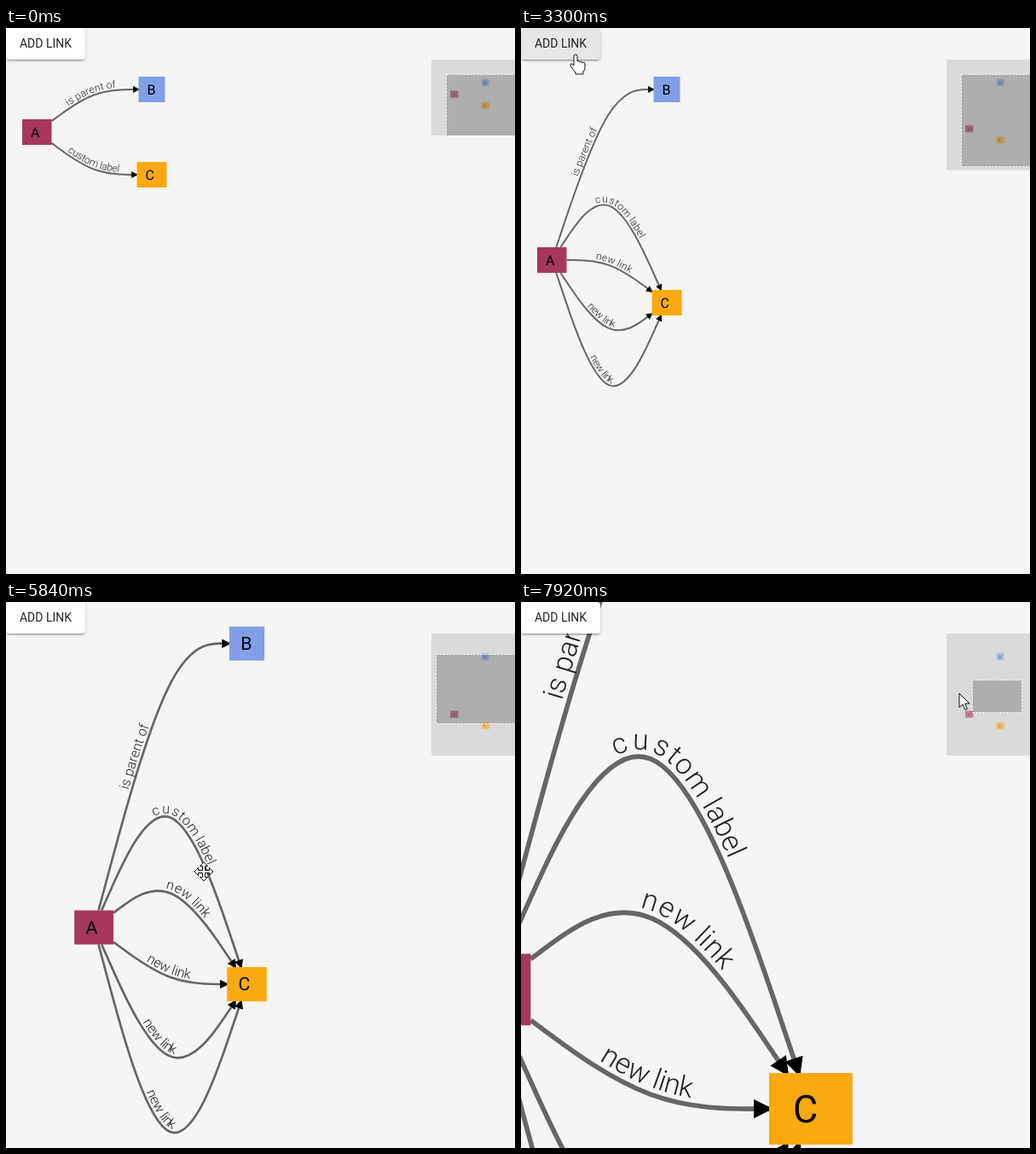
An HTML page for the animation above (8000 ms loop, 597 by 640 pixels).

```html
<!DOCTYPE html>
<html lang="en">
<head>
<meta charset="utf-8">
<title>Graph links</title>
<style>
  html, body { margin: 0; width: 100%; height: 100%; overflow: hidden; background: #f5f5f5; }
  body { position: relative; font-family: Roboto, sans-serif; }
  svg { display: block; position: absolute; left: 0; top: 0; }
  .link { fill: none; stroke: #666; stroke-width: 2; }
  .label { font-size: 12px; font-weight: 300; fill: #251e1e; text-anchor: middle; }
  .node { font-size: 16px; fill: #000; }
  text { text-rendering: geometricPrecision; }
  #button {
    position: absolute; left: 0; top: 0; width: 93px; height: 37px; border-radius: 4px;
    overflow: hidden; background: #fff; color: rgba(0, 0, 0, .87);
    font: 400 14px/37px Roboto, sans-serif; text-align: center;
    box-shadow: 0 3px 1px -2px rgba(0,0,0,.2), 0 2px 2px rgba(0,0,0,.14), 0 1px 5px rgba(0,0,0,.12);
  }
  #button.down {
    box-shadow: 0 5px 5px -3px rgba(0,0,0,.2), 0 8px 10px 1px rgba(0,0,0,.14), 0 3px 14px 2px rgba(0,0,0,.12);
  }
  #ripple {
    position: absolute; left: -11px; top: -43px; width: 150px; height: 150px;
    border-radius: 50%; background: rgba(0, 0, 0, .1);
  }
  #cursors path { fill: #fff; stroke: #111; stroke-linejoin: round; }
  #spot { fill: #fbf45c; mix-blend-mode: multiply; }
</style>
</head>
<body>
<svg width="597" height="640" viewBox="0 0 597 640">
  <defs>
    <marker id="arrow" viewBox="0 -5 10 10" refX="8" refY="0" markerWidth="4" markerHeight="4" orient="auto">
      <path d="M0-5L10 0L0 5"/>
    </marker>
  </defs>
  <g id="graph"></g>
  <svg id="map" x="499" y="37" width="98" height="89">
    <rect width="98" height="200" fill="#dadada"/>
    <g id="mini" opacity=".55" transform="translate(17 7.6) scale(.27)"></g>
    <rect id="view" fill="rgba(0,0,0,.2)" stroke="#fff" stroke-dasharray="2 2"/>
  </svg>
</svg>
<div id="button"><div id="ripple"></div>ADD LINK</div>
<svg id="cursors" width="597" height="640" viewBox="0 0 597 640">
  <path id="move" d="M0-11l4.5 4.5h-3v5h5v-3L11 0 6.500 4.500v-3h-5v5h3L0 11l-4.500-4.500h3v-5h-5v3L-11 0l4.500-4.500v3h5v-5h-3z"/>
  <path id="hand" d="M-2 12V1Q-2-1 0-1T2 1V7Q4 5 5 8 7 6 8 9 11 7 11 11V15Q11 18 9 19V22H0V20Q-3 17-6 12-6 9-4 10Z"/>
  <path id="pointer" d="M0 0V16.500L4 13 7 19.500 9.500 18.300 6.800 12H12Z"/>
  <circle id="spot" r="12"/>
</svg>
<script>
const $ = id => document.getElementById(id);
const LOOP = 8000;
const MAP = .27;
const PRESSES = [1380, 2230, 2990, 3610];
const LAYOUT_DELAY = 230;
const DRAG = { from: 4600, to: 5380, x: 141, y: 210 };
const PAN = [98.5, 43];
const ZOOM_AT = [230.3, 315.3];

// Cursor moves: start, end, x, y
const ENTRY = [454, 611];
const MOVES = [
  [140, 910, 86.5, 45], [910, 1060, 64, 32], [4200, 4380, 138, 203],
  [4380, 4460, DRAG.x, DRAG.y], [DRAG.from, 5070, 239, 235],
  [5070, DRAG.to, DRAG.x + PAN[0], DRAG.y + PAN[1]], [DRAG.to, 5460, 232, 316], [7760, 7920, 514, 107]
];
// Wheel bursts: start, notches, ms between notches
const WHEEL = [
  [5535, 2, 75], [5830, 1, 0], [6460, -2, 0], [6920, 3, 0],
  [7000, 1, 0], [7220, 2, 75], [7530, 4, 75]
];

const clamp = v => Math.max(0, Math.min(1, v));

function cursorAt(t) {
  let [x, y] = ENTRY;
  for (const [from, to, nx, ny] of MOVES) {
    const p = clamp((t - from) / (to - from));
    x += (nx - x) * p;
    y += (ny - y) * p;
  }
  return [x, y];
}

function zoomAt(t) {
  let zoom = 1;
  for (const [from, notches, gap] of WHEEL)
    for (let i = 0; i < Math.abs(notches); i++)
      if (t >= from + i * gap) zoom *= notches > 0 ? 1.1 : .9;
  return zoom;
}

// Point where the line from a node's centre towards (x, y) leaves its box
function border(n, x, y) {
  const dx = x - n.x, dy = y - n.y;
  const k = Math.min(n.w / 2 / Math.abs(dx), 15 / Math.abs(dy));
  return [n.x + dx * k, n.y + dy * k];
}

// B-spline through three control points
function spline(a, b, c) {
  const mix = (i, j, k) => a.map((v, n) => ((v * i + b[n] * j + c[n] * k) / (i + j + k)).toFixed(2));
  return `M${a}L${mix(5, 1, 0)}C${mix(2, 1, 0)} ${mix(1, 2, 0)} ${mix(1, 4, 1)}` +
         `C${mix(0, 2, 1)} ${mix(0, 1, 2)} ${mix(0, 1, 5)}L${c}`;
}

function link(from, to, y, text, i) {
  const mid = [103.5, y];
  const d = spline(border(from, ...mid), mid, border(to, ...mid));
  return `<path class="link" id="link${i}" d="${d}" marker-end="url(#arrow)"/>
    <text class="label" dy="-2.9"><textPath href="#link${i}" startOffset="50%">${text}</textPath></text>`;
}

const box = n => `<g transform="translate(${n.x - n.w / 2} ${n.y - 15})">
  <rect width="${n.w}" height="30" fill="${n.fill}"/>
  <text class="node" x="10" y="20.6">${n.name}</text></g>`;

let shown = 0;
function layout(count) {
  if (count === shown) return;
  shown = count;
  const a = { name: 'A', x: 36.25, y: 72 + 50 * count, w: 34.5, fill: '#a5375d' };
  const b = { name: 'B', x: 171, y: 72, w: 31, fill: '#819ee6' };
  const c = { name: 'C', x: 171, y: 122 + 50 * count, w: 35, fill: '#faa90f' };
  let links = link(a, b, 72, 'is parent of', 0);
  for (let i = 1; i <= count; i++)
    links += link(a, c, 72 + 100 * i, i === 1 ? 'custom label' : 'new link', i);
  const nodes = [a, b, c].map(box).join('');
  $('graph').innerHTML = links + nodes;
  $('mini').innerHTML = nodes;
  $('map').setAttribute('height', 75.5 + 13.5 * count);
}

function place(id, visible, x, y) {
  $(id).style.display = visible ? '' : 'none';
  $(id).setAttribute('transform', `translate(${x} ${y})`);
}

function viewport(zoom, x, y) {
  $('graph').setAttribute('transform', `translate(${x} ${y}) scale(${zoom})`);
  const snap = v => Math.round(v) - .5;
  const attrs = {
    x: snap(17.5 - x / zoom * MAP), y: snap(8.6 - (y - 35) / zoom * MAP),
    width: Math.round(597 * MAP / zoom), height: Math.round(107.5 / zoom)
  };
  for (const k in attrs) $('view').setAttribute(k, attrs[k]);
}

function draw(t) {
  layout(1 + PRESSES.filter(p => t >= p + LAYOUT_DELAY).length);

  const [cx, cy] = cursorAt(t);
  place('move', t >= 140 && t < 980 || t >= 4210 && t < 7800, cx, cy);
  place('hand', t >= 980 && t < 4210, cx, cy);
  place('pointer', t >= 7800, cx, cy);
  place('spot', t >= 4450 && t < 5420, cx, cy);

  const zoom = zoomAt(t);
  let pan = [0, 0];
  if (t >= DRAG.to) pan = PAN;
  else if (t >= DRAG.from) pan = [cx - DRAG.x, cy - DRAG.y];
  viewport(zoom, ...pan.map((v, i) => ZOOM_AT[i] + (v - ZOOM_AT[i]) * zoom));

  const age = t - (PRESSES.filter(p => p <= t).pop() ?? -LOOP);
  const grow = 1 - (1 - clamp(age / 450)) ** 3;
  $('ripple').style.transform = `scale(${grow})`;
  $('ripple').style.opacity = clamp((610 - age) / 310);
  $('button').className = age < 300 ? 'down' : '';
}

const start = performance.now();
function tick() {
  draw((performance.now() - start) % LOOP);
  requestAnimationFrame(tick);
}
tick();
</script>
</body>
</html>
```
